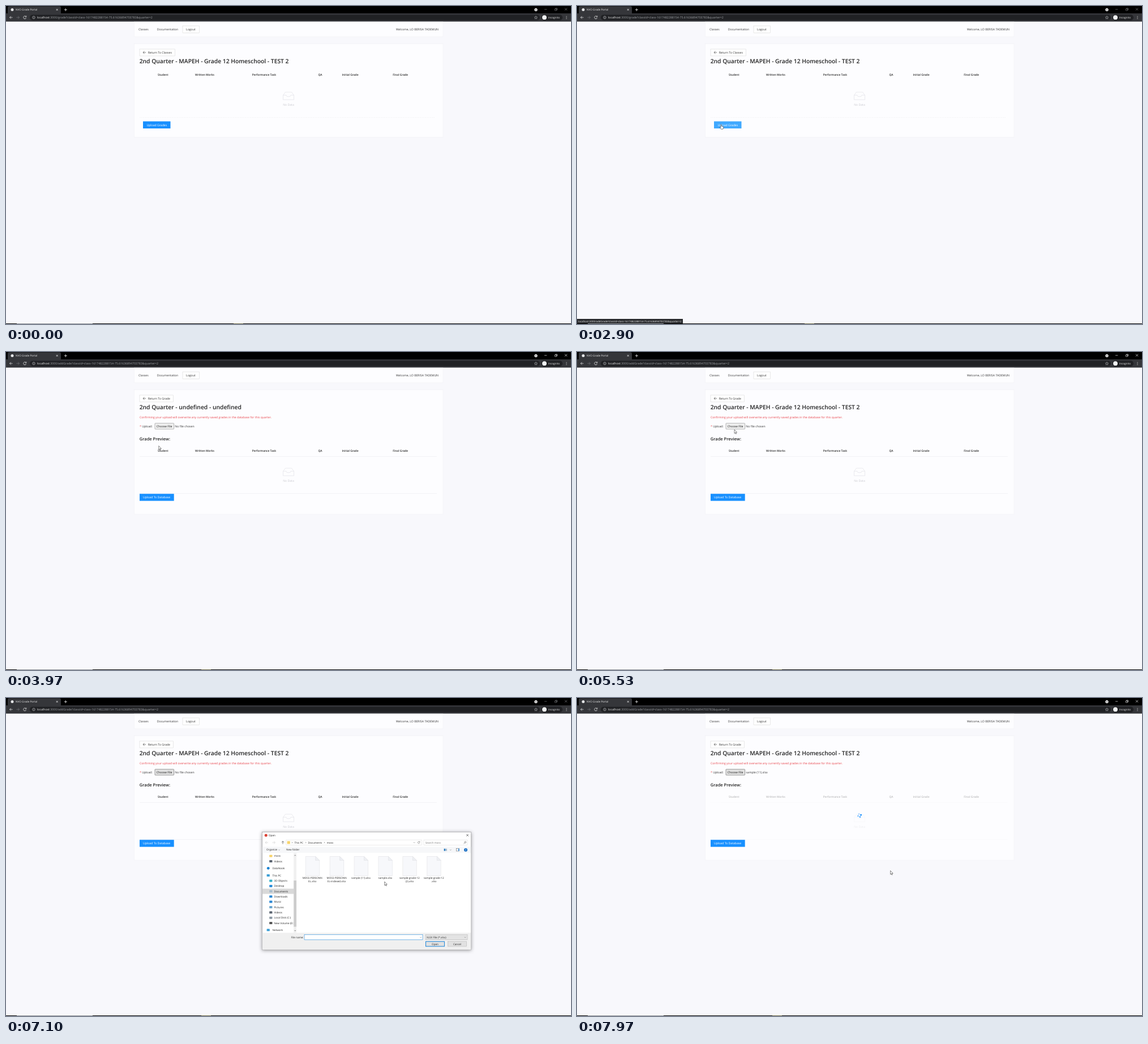
These frames come from a looping animation (998x561 px, 8 s). An HTML page:

```html
<!DOCTYPE html>
<html lang="en">
<head>
<meta charset="utf-8">
<title>Grade upload</title>
<style>
  html, body { margin: 0; width: 100%; height: 100%; overflow: hidden; background: #f8f8fc; }
  svg { display: block; width: 998px; height: 561px; font-family: "Open Sans", "Noto Sans", sans-serif; }
  text { text-rendering: geometricPrecision; white-space: pre; }
</style>
</head>
<body>
<svg id="stage" viewBox="0 0 998 561"></svg>
<script>
const LOOP = 8000;

// Markup helpers; text is placed by its visual middle
const text = (x, y, s, size = 5.15, fill = '#333', more = '') =>
  `<text x="${x}" y="${y + size * .36}" font-size="${size}" fill="${fill}" ${more}>${s}</text>`;
const bold = (x, y, s, size, fill = '#222') => text(x, y, s, size, fill, 'font-weight="600"');
const mid = (x, y, s, size, fill, more = '') => text(x, y, s, size, fill, `text-anchor="middle" ${more}`);
const rect = (x, y, w, h, fill, stroke = 'none', more = '') =>
  `<rect x="${x}" y="${y}" width="${w}" height="${h}" fill="${fill}" stroke="${stroke}" stroke-width=".5" ${more}/>`;
const line = (d, stroke, w = .6, fill = 'none') =>
  `<path d="${d}" stroke="${stroke}" stroke-width="${w}" fill="${fill}"/>`;
const dot = (x, y, r, fill, stroke = 'none') =>
  `<circle cx="${x}" cy="${y}" r="${r}" fill="${fill}" stroke="${stroke}" stroke-width=".6"/>`;
const group = (id, body, more = '') => `<g id="${id}" ${more}>${body}</g>`;
const arrow = (x, y, dir, color, w = .7) =>
  line(`M${x + 2.5 * dir} ${y}h${-5 * dir}M${x + .2 * dir} ${y - 2.3}l${2.3 * dir} 2.3l${-2.3 * dir} 2.3`, color, w);

const query = '?classId=class-1617482288154-75.61636894703783&amp;quarter=2';
const url = page => text(55, 20.2, `localhost<tspan fill="#a2a5a9">:3000/${page}${query}</tspan>`, 5.23, '#f1f1f1');

const browser = rect(0, 0, 998, 14, '#000')
  + line('M3 14V3q0-2.5 2.5-2.5h89q2.5 0 2.5 2.5V14z', 'none', 0, '#35363a')
  + rect(0, 13, 998, 14.5, '#35363a')
  + dot(11, 6.6, 2.5, '#e4e5e7') + text(17, 6.6, 'NVO Grade Portal', 4.65, '#eee')
  + line('M88.7 5l3 3m0-3l-3 3M102.8 6.6h5M105.3 4.1v5', '#eee', .8)
  + dot(936, 6.6, 2.7, '#f4f4f4') + line('M934.7 6l1.3 1.4l1.3-1.4', '#111', .8)
  + group('winButtons', line('M951 6h4.4M969.5 5h3v3h-3zM970.5 5v-1h3v3h-1M987 3.7l4.2 4.2m0-4.2l-4.2 4.2', 'currentColor', .6))
  + rect(42, 15.4, 901, 9.8, '#202124', 'none', 'rx="4.9"')
  + arrow(9, 20.2, -1, '#f1f1f1') + arrow(21, 20.2, 1, '#77797d')
  + line('M35.2 18.6a2.5 2.5 0 1 0 .4 2.4M35.8 17.2v2h-2', '#f1f1f1', .75)
  + dot(49, 20.2, 2.3, 'none', '#d5d6d8') + line('M49 19.8v1.6M49 18.7v.6', '#d5d6d8')
  + line('M936 17.6l.8 1.8l1.9.2l-1.4 1.3l.4 1.9l-1.7-1l-1.7 1l.4-1.9l-1.4-1.3l1.9-.2z', '#d5d6d8', .5)
  + rect(945.5, 15.2, 37.5, 10.2, '#202124', 'none', 'rx="5.1"')
  + dot(951, 20.2, 3.9, '#f1f3f4') + text(958, 20.2, 'Incognito', 4.6, '#f1f1f1')
  + [18.2, 20.2, 22.2].map(y => dot(990, y, .55, '#eee')).join('');

const card = (y, h) => rect(226.5, y, 545.5, h, '#fdfdff', '#efeff3');
const button = (x, y, w, h, label, tx) =>
  rect(x, y, w, h, '#fefefe', '#d4d4d4') + text(tx, y + h / 2, label);
const back = (w, label) => button(236, 76, w, 12, label, 250.7) + arrow(244.6, 82, -1, '#333', .6);
const title = s => bold(235.7, 97.2, s, 10.3);
const course = title('2nd Quarter - MAPEH - Grade 12 Homeschool - TEST 2');

const table = y => [[268, 'Student'], [334, 'Written Works'], [434.7, 'Performance Task'],
    [551.5, 'QA'], [593.5, 'Initial Grade'], [683.3, 'Final Grade']]
    .map(([x, s]) => bold(x, y, s, 4.9)).join('')
  + line(`M489.5 ${y + 36}l4-5.3h11l4 5.3v8h-19zh5.5q.4 2.4 2 2.4h4q1.6 0 2-2.4h5.5`, '#d6d6dc', .5)
  + mid(499, y + 53, 'No Data', 5.15, '#c9c9cf');

const nav = card(28, 26) + text(234, 40.8, 'Classes') + text(266.8, 40.8, 'Documentation')
  + button(312, 35, 29.5, 12.5, 'Logout', 318)
  + text(764, 40.8, 'Welcome, LO BERISA TADEMUN', 5.15, '#333', 'text-anchor="end"');

const gradePage = url('grade') + card(66.5, 165) + back(62.5, 'Return To Classes') + course + table(121.3)
  + line('M236 196.8H757', '#ececf0', .6).replace('/>', ' stroke-dasharray="2 1"/>')
  + rect(242, 203.5, 48.5, 12.5, '#1890ff', 'none', 'id="gradeButton"')
  + text(248.4, 209.8, 'Upload Grades', 5.15, '#fff');

const uploadPage = url('addGrade') + card(66.5, 219.5) + back(59.5, 'Return To Grade')
  + group('loading', title('2nd Quarter - undefined - undefined')) + group('loaded', course)
  + text(236, 115, 'Confirming your upload will overwrite any currently saved grades in the database for this quarter.', 5.15, '#e8434a')
  + text(236, 131, '<tspan fill="#e8434a">*</tspan> Upload:')
  + rect(263, 125.7, 33.6, 10.4, '#efefef', '#767676', 'id="choose" rx=".8"')
  + text(265.8, 131, 'Choose File', 5.2, '#111')
  + `<text id="fileName" x="298.3" y="132.9" font-size="5.2" fill="#333"></text>`
  + bold(235.8, 153.6, 'Grade Preview:', 7.5)
  + group('table', table(174.3) + line('M236 184.5H761M236 249.5H761', '#ececf0'))
  + rect(236, 250.2, 60.7, 12.4, '#1890ff') + text(242, 256.4, 'Upload To Database', 5.15, '#fff')
  + group('spinner', [1, .75, .5, .3].map((o, i) =>
      `<circle cx="${499 + 2.7 * Math.cos(i * Math.PI / 2)}" cy="${207.2 + 2.7 * Math.sin(i * Math.PI / 2)}" r="1.5" fill="#1890ff" opacity="${o}"/>`).join(''));

// File dialog
const small = (x, y, s, fill = '#222') => text(x, y, s, 4.6, fill);
const folders = [
  ['moss', 278.7, 1, '#f7d36b'], ['Videos', 288, 1, '#5b6470'], ['DataNook', 300.3, 0, '#1680d0'],
  ['This PC', 313, 0, '#3d9fd6'], ['3D Objects', 322.4, 1, '#35b0c9'], ['Desktop', 331.7, 1, '#2389d8'],
  ['Documents', 341, 1, '#a9bccb'], ['Downloads', 350.3, 1, '#2b87d3'], ['Music', 359.6, 1, '#2b87d3'],
  ['Pictures', 369, 1, '#6aa5cf'], ['Videos', 378.3, 1, '#5b6470'], ['Local Disk (C:)', 387.7, 1, '#8b98a3'],
  ['New Volume (D:)', 397, 1, '#555'], ['Network', 409.3, 0, '#3d9fd6']];
const folder = ([name, y, level, color]) => (name === 'DataNook' ? dot(463.2, y, 2.4, color)
    : rect(460.6 + 4.6 * level, y - 2, 5.2, 4, color, 'none', 'rx=".6"'))
  + small(470.6 + 3 * level, y, name);
const files = [['MOSS-PERSONN', 'EL.xlsx'], ['MOSS-PERSONN', 'EL-indexed.xlsx'], ['sample (11).xlsx'],
  ['sample.xlsx'], ['sample-grade-12', '(2).xlsx'], ['sample-grade-12', '.xlsx']];
const file = (lines, i) => {
  const x = 541.2 + 42.9 * i;
  return line(`M${x - 12} 279.5h17.5l7 7v27h-24.5z`, '#dcdce0', .5, '#f7f8fb')
    + line(`M${x + 5.5} 279.5v7h7z`, '#dcdce0', .5, '#eef0f4')
    + lines.map((s, k) => mid(x, 317.6 + 5.8 * k, s, 4.55, '#222')).join('');
};
const chevron = (x, y, c = '#555') => line(`M${x - 1.2} ${y - .6}l1.2 1.2l1.2-1.2`, c, .5);
const crumb = x => line(`M${x} 253.8l1.2 1.2l-1.2 1.2`, '#555', .5);

const dialog = rect(452.5, 236.5, 369, 207.5, '#fff', '#8a8a8e', 'style="filter:drop-shadow(0 1.5px 3px #0006)"')
  + dot(459.2, 242.2, 2.5, '#db4437') + small(464, 242.3, 'Open')
  + line('M813.2 240.2l3.8 3.8m0-3.8l-3.8 3.8', '#222', .6)
  + arrow(460.5, 255, -1, '#d0d0d0') + arrow(473, 255, 1, '#d0d0d0')
  + line('M489 257.6v-5M487 254.6l2-2l2 2', '#444', .7)
  + rect(494.8, 250.4, 239.4, 9, '#fff', '#d9d9d9') + rect(496.6, 252.5, 5.2, 5, '#f7d36b')
  + crumb(504.8) + small(509.5, 255, 'This PC') + crumb(529) + small(533.6, 255, 'Documents')
  + crumb(561.8) + small(566.8, 255, 'moss')
  + chevron(721, 255) + line('M730.6 254a1.8 1.8 0 1 0 .2 1.6M731 252.7v1.6h-1.6', '#555', .5)
  + rect(738, 250.4, 77, 9, '#fff', '#d9d9d9') + small(740.8, 255, 'Search moss', '#777')
  + dot(811.3, 254.4, 1.4, 'none', '#555') + line('M810.3 255.5l-1.7 1.8', '#555')
  + rect(452.8, 262.5, 368.4, 10.8, '#f6f7f9') + small(460, 267.8, 'Organize') + chevron(482.5, 268)
  + small(495, 267.8, 'New folder')
  + rect(773.6, 265.8, 2.4, 4, '#2d7ec2') + rect(776.4, 265.8, 2.4, 4, '#9db7cc') + chevron(785.3, 268)
  + rect(795.4, 265.6, 5.2, 4.4, '#fff', '#555') + rect(798.8, 265.6, 1.8, 4.4, '#4a9be0')
  + dot(812, 267.9, 3, '#1a6fc4') + mid(812, 267.9, '?', 4.6, '#fff', 'font-weight="600"')
  + rect(452.8, 336.4, 55.4, 9.2, '#d9d9d9') + folders.map(folder).join('')
  + rect(508.2, 273.5, 5, 140.5, '#f0f0f0') + rect(508.2, 322, 5, 81.5, '#cdcdcd')
  + line('M509.5 278.3l1.2-1.2l1.2 1.2M509.5 409.8l1.2 1.2l1.2-1.2', '#444', .7)
  + rect(513.2, 273.5, 308, 140.5, '#fff')
  + rect(606.2, 276, 42, 51, '#e5f3ff', '#cce8ff', 'id="picked"') + files.map(file).join('')
  + rect(452.8, 414.2, 368.4, 29.5, '#f0f0f0')
  + small(503.6, 422, 'File name:') + rect(527, 417.6, 209, 9, '#fff', '#0078d7')
  + group('typed', small(528.6, 422, 'sample (11).xlsx')) + group('caret', line('M528.9 419.5v5', '#111', .5))
  + chevron(732.6, 422.2)
  + rect(741, 417.6, 74, 9, '#e3e3e3', '#adadad') + small(743, 422, 'XLSX File (*.xlsx)') + chevron(811, 422.2)
  + rect(741.4, 429.7, 33, 8.4, '#e1e1e1', '#0078d7', 'style="stroke-width:.9"') + mid(758, 433.9, 'Open', 4.6, '#222')
  + rect(780.3, 429.7, 33.2, 8.4, '#e1e1e1', '#adadad') + mid(797, 433.9, 'Cancel', 4.6, '#222');

const pointer = group('arrowCursor', line('M0 0V6.6L1.5 5.2L2.5 7.5L3.5 7.1L2.5 4.8H4.6z', '#111', .5, '#fff'))
  + group('handCursor', line('M-.7 .6q.7-1 1.4 0V3l3 .7q.7.2.6 1L3.9 6.3L3.4 8.2H-.3L-2.4 4.9q.5-.8 1.7.3z', '#111', .5, '#fff'));

document.getElementById('stage').innerHTML = browser + nav
  + group('gradePage', gradePage) + group('uploadPage', uploadPage)
  + group('status', rect(0, 552, 187, 9, '#292a2d') + text(2, 556.3, 'localhost:3000/addGrade' + query, 4.47, '#eee'))
  + rect(0, 560, 998, 1, '#000') + rect(19, 560, 134, 1, '#8c9096') + rect(0, 560, 17, 1, '#6b6744', 'none', 'id="taskMark"')
  + group('dialog', dialog) + group('cursor', pointer);

const el = id => document.getElementById(id);
const show = (id, on) => el(id).setAttribute('display', on ? 'inline' : 'none');
const set = (id, name, value) => el(id).setAttribute(name, value);
const progress = (t, from, to) => Math.min(1, Math.max(0, (t - from) / (to - from)));

// Cursor stops: time, x, y
const path = [[400, 967, 433], [570, 559, 291], [1100, 559, 291], [1650, 104, 165], [1900, 140, 172],
  [2130, 252, 177], [2330, 252, 177], [2620, 254.6, 209], [3300, 254.6, 209], [3900, 269.8, 165.6],
  [4070, 269.8, 165.6], [4480, 246, 136], [4670, 246, 136], [5200, 278, 137], [5530, 278, 137],
  [5800, 281, 130], [6850, 281, 130], [7090, 668.7, 324], [7150, 668.7, 324], [7350, 627, 306],
  [7740, 627, 306], [7950, 553.6, 304.6]];
function cursorAt(t) {
  const i = path.findIndex(p => p[0] > t);
  if (i < 0) return path[path.length - 1].slice(1);
  const a = path[Math.max(0, i - 1)], b = path[i];
  const p = progress(t, a[0], b[0]), e = p * p * (3 - 2 * p);
  return [a[1] + (b[1] - a[1]) * e, a[2] + (b[2] - a[2]) * e];
}

function draw(t) {
  const upload = t >= 3230, overButton = t >= 2540 && !upload;
  show('gradePage', !upload);
  show('uploadPage', upload);
  show('status', t >= 2640 && t < 3500);
  set('gradeButton', 'fill', overButton ? '#40a9ff' : '#1890ff');
  set('taskMark', 'x', upload ? 345 : 402);
  const active = t >= 3100 && t < 6400 || t >= 7640;
  set('winButtons', 'color', active ? '#fff' : '#85878a');

  show('loading', t < 4200);
  show('loaded', t >= 4200);
  const hover = t >= 5650;
  set('choose', 'fill', hover ? '#e2e2e2' : '#efefef');
  set('choose', 'stroke', hover ? '#444' : '#767676');
  el('fileName').textContent = t < 7740 ? 'No file chosen' : 'sample (11).xlsx';

  const spin = progress(t, 7740, 7960);
  set('table', 'opacity', 1 - .7 * spin);
  set('spinner', 'opacity', spin);
  set('spinner', 'transform', `rotate(${(t - 7970) * .3 - 20} 499 207.2)`);

  const open = progress(t, 6400, 6525), close = progress(t, 7670, 7770);
  const scale = 1 - .1 * (1 - open) ** 3 - .06 * close;
  show('dialog', open > 0 && close < 1);
  set('dialog', 'opacity', Math.min(1, open * 2) * (1 - close));
  set('dialog', 'transform', `translate(637 340.2) scale(${scale}) translate(-637 -340.2)`);
  show('picked', t >= 7280);
  set('picked', 'fill', t >= 7440 ? '#cce8ff' : '#e5f3ff');
  show('typed', t >= 7440);
  show('caret', t < 7440 && (t - 6400) % 1060 < 530);

  const [x, y] = cursorAt(t);
  show('cursor', t >= 400);
  show('arrowCursor', !overButton);
  show('handCursor', overButton);
  set('cursor', 'transform', `translate(${x} ${y})`);
}

const start = performance.now();
function tick() {
  draw((performance.now() - start) % LOOP);
  requestAnimationFrame(tick);
}
tick();
</script>
</body>
</html>
```
